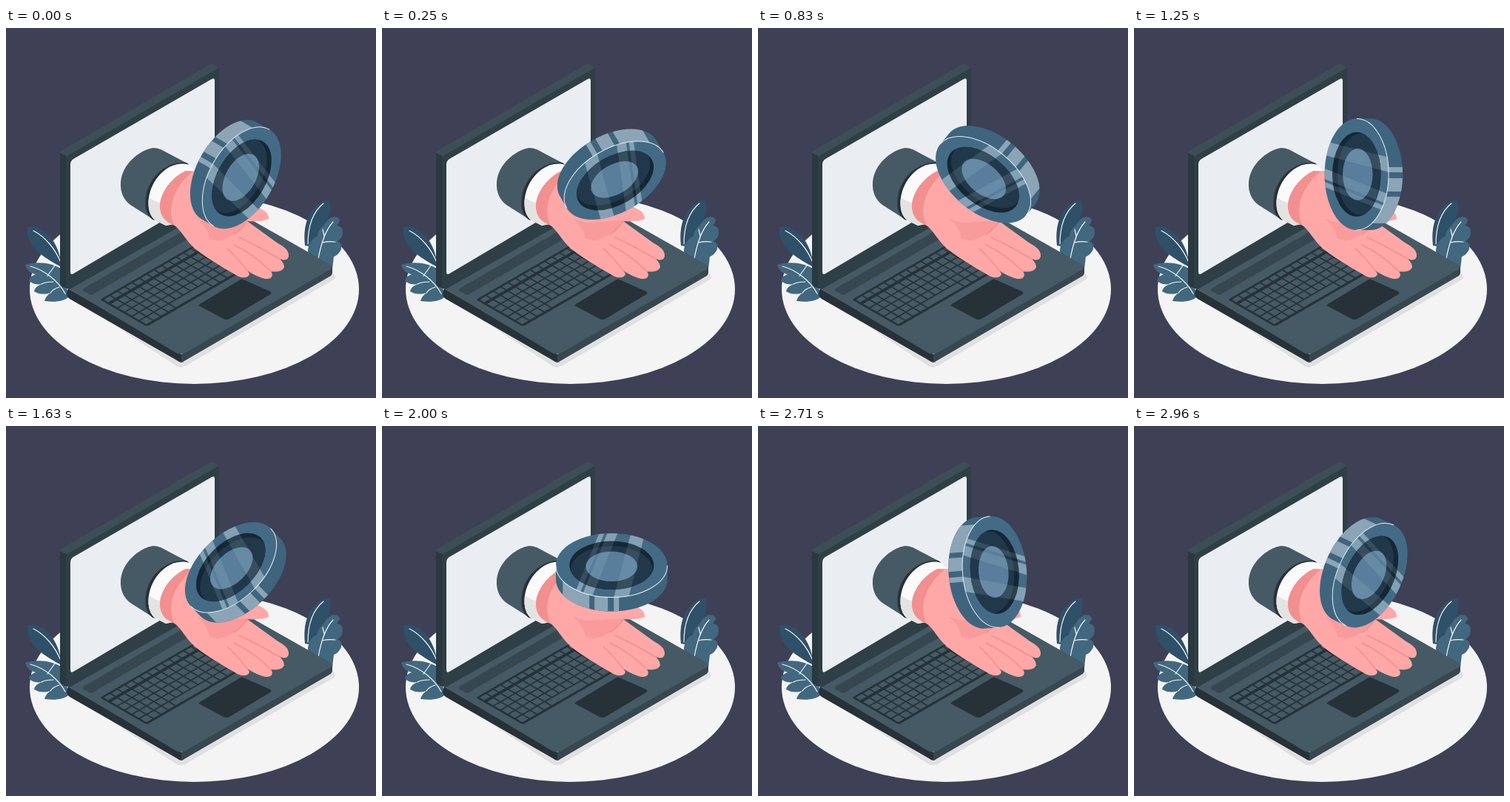
These frames come from a looping animation (500 px wide and 500 px high, 3 s). An HTML page:

```html
<!DOCTYPE html>
<html lang="en">
<head>
<meta charset="utf-8">
<title>Coin over an open hand</title>
<style>
html, body { margin: 0; width: 100%; height: 100%; overflow: hidden; background: #3e4055; }
svg { display: block; width: 100%; height: 100%; }
.vein { fill: none; stroke: #f4f4f4; stroke-width: 1.2; stroke-linecap: round; }
.crease { fill: none; stroke: #f28f8f; stroke-width: 1.5; stroke-linecap: round; }
</style>
</head>
<body>
<svg viewBox="0 0 500 500">
  <defs>
    <clipPath id="sideClip"><path d="M-75.3-9.5V9.5A75.3 43.3 0 0 0 75.3 9.5V-9.5Z"/></clipPath>
    <clipPath id="faceClip"><ellipse cy="-9.5" rx="75.3" ry="43.3"/></clipPath>
    <clipPath id="wellClip"><ellipse cy="-9.5" rx="57" ry="32.8"/></clipPath>
    <path id="bands" d="M-17-53h7L-45 34h-7ZM-6-53H8L-27 34h-14ZM26-53H45L23 34H3Z"/>
  </defs>

  <ellipse cx="254.5" cy="353" rx="222.5" ry="128" fill="#f4f4f4"/>
  <path d="M77 356L229 456Q236 461 244 456L443 340Q448 336 441 331L237 440Z" fill="#e0e0e0"/>

  <!-- plants -->
  <path d="M29 270C46 263 72 284 75 323C54 312 26 296 29 270Z" fill="#2f5069"/>
  <path class="vein" d="M37 274C53 282 67 299 74 317"/>
  <path d="M26 320C42 315 62 317 76 326L85 363C80 369 67 371 52 369Q54 362 60 358Q48 362 38 356Q39 349 49 346Q36 348 31 341Q33 335 40 333Q29 331 26 320Z" fill="#41687f"/>
  <path class="vein" d="M33 322C52 327 71 342 80 359M56 335L66 321M64 343Q53 343 48 346M72 350Q63 353 60 358"/>
  <path d="M404 294C400 261 413 236 437 232C443 249 430 277 410 295Z" fill="#2f5069"/>
  <path class="vein" d="M429 237C414 249 408 268 408 292"/>
  <path d="M408 302C408 291 414 285 420 282Q423 272 430 266Q434 258 442 255Q451 255 451 261L447 267Q456 268 455 277Q455 284 448 288Q455 290 453 299Q449 307 443 309L441 326L412 316Z" fill="#41687f"/>
  <path class="vein" d="M442 262C430 275 425 295 422 312M427 290Q436 288 445 289M430 281L428 272"/>

  <!-- laptop -->
  <path d="M84 352L237 441V452Q233 451 229 448L86 366Q82 363 82 358Z" fill="#263238"/>
  <path d="M237 441L441 322V330Q441 334 437 336L241 450Q239 452 237 452Z" fill="#37474f"/>
  <path d="M84 352L287 234L437 319Q444 323 437 327L242 439Q236 442 230 439Z" fill="#455a64"/>
  <path d="M73 172Q73 167 78 164L274 50Q279 47 284 51L288 55V238L86 353L77 350Q73 348 73 344Z" fill="#37474f"/>
  <path d="M73 169L86 176V353L77 350Q73 348 73 344Z" fill="#2a3940"/>
  <path d="M81 172L284 55Q288 53 288 58V238L86 353L81 350Z" fill="#2f3f46"/>
  <path d="M73 169Q73 167 78 164L274 50Q279 47 284 51L287 54L86 171L83 173Z" fill="#3c4e56"/>
  <path d="M87 184Q87 180 91 177L278 69Q282 67 282 71V219L91 332Q87 334 87 330Z" fill="#eaeef2"/>
  <path d="M105 352L236 276Q240 274 244 277L249 280Q252 282 248 284L119 359Q115 362 111 359L105 356Q102 354 105 352Z" fill="#37474f"/>
  <g id="keys" transform="matrix(.866 -.5 .866 .5 127 367)">
    <rect width="166" height="73" rx="3" fill="#263238"/>
  </g>
  <path d="M262 373L315 341Q319 338 323 341L357 356Q360 358 357 360L302 393Q298 395 294 393L262 376Q259 375 262 373Z" fill="#263238"/>

  <!-- arm -->
  <path d="M199 162C180 165 157 184 155 208C154 223 160 233 168 239L198 258L247 184L209 164Q204 162 199 162Z" fill="#455a64"/>
  <path d="M244 182C219 179 193 200 189 228C187 243 190 253 198 259L212 262L250 188Z" fill="#263238"/>
  <path d="M248 185C222 177 197 202 193 229C191 245 195 255 202 260L216 267L232 264L257 196Z" fill="#fafafa"/>
  <path d="M193 229C191 245 195 255 202 260L216 267L232 264L220 238Q206 238 193 229Z" fill="#e3e3e3"/>
  <path d="M243 193C225 201 209 221 208 240C208 254 215 262 228 267C238 275 243 287 255 298C272 311 290 322 311 334C319 339 328 338 329 332L326 328Q340 337 351 339C359 340 362 334 358 329C366 330 374 329 376 323Q376 318 370 312C377 315 382 313 382 307C382 300 375 295 366 290L326 261Q346 262 355 258C356 250 347 245 338 241L300 194Z" fill="#ffa8a7"/>
  <path d="M243 193C225 201 209 221 208 240C208 254 215 262 228 267C219 251 221 220 252 194Z" fill="#f28f8f"/>
  <path d="M257 257Q275 266 292 262L326 260Q318 273 302 282Q286 291 274 284Q274 270 257 257Z" fill="#f99b9b"/>
  <path class="crease" d="M299 298Q314 312 326 328M308 293Q335 306 357 328M315 283Q343 296 370 312M326 261Q319 272 308 279"/>

  <!-- coin, lying flat around its turning point -->
  <g id="coin">
    <path d="M-75.3-9.5V9.5A75.3 43.3 0 0 0 75.3 9.5V-9.5Z" fill="#3f647d"/>
    <path d="M-66-10h36v70h-36ZM-23-10h18v70h-18ZM3-10h7v70h-7Z" fill="#8ba5b6" clip-path="url(#sideClip)"/>
    <ellipse cy="-9.5" rx="75.3" ry="43.3" fill="#436b85"/>
    <g clip-path="url(#faceClip)"><use href="#bands" fill="#c8dbe5" opacity=".48"/></g>
    <path d="M-75.3-9.5A75.3 43.3 0 0 0 75.3-9.5" fill="none" stroke="#e6eef2"/>
    <ellipse cy="-9.5" rx="57" ry="32.8" fill="#152735"/>
    <g clip-path="url(#wellClip)">
      <ellipse cy="-4" rx="55" ry="31.5" fill="#20384a"/>
      <ellipse cy="-8" rx="35" ry="20.2" fill="#587e9b"/>
      <use href="#bands" fill="#c8dbe5" opacity=".13"/>
    </g>
  </g>
</svg>
<script>
const LOOP = 3000, FLAT_AT = 2000;
const coin = document.getElementById("coin");

let keys = "";
for (let row = 0; row < 6; row++) {
  for (let col = 0; col < 14; col++) {
    const x = 3 + col * 11.5, y = 3 + row * 11.4;
    if (row === 5 && col > 3 && col < 9) {
      if (col === 4) keys += `M${x} ${y}h55.5v9.4h-55.5Z`;
      continue;
    }
    keys += `M${x} ${y}h9.5v${row ? 9.4 : 7}h-9.5Z`;
  }
}
document.getElementById("keys").insertAdjacentHTML("beforeend", `<path d="${keys}" fill="#455a64"/>`);

const start = performance.now();
function draw() {
  const t = (performance.now() - start) % LOOP;
  const angle = (t - FLAT_AT) / LOOP * 360;
  coin.setAttribute("transform", `translate(310.3 197.8) rotate(${angle})`);
  requestAnimationFrame(draw);
}
draw();
</script>
</body>
</html>
```
